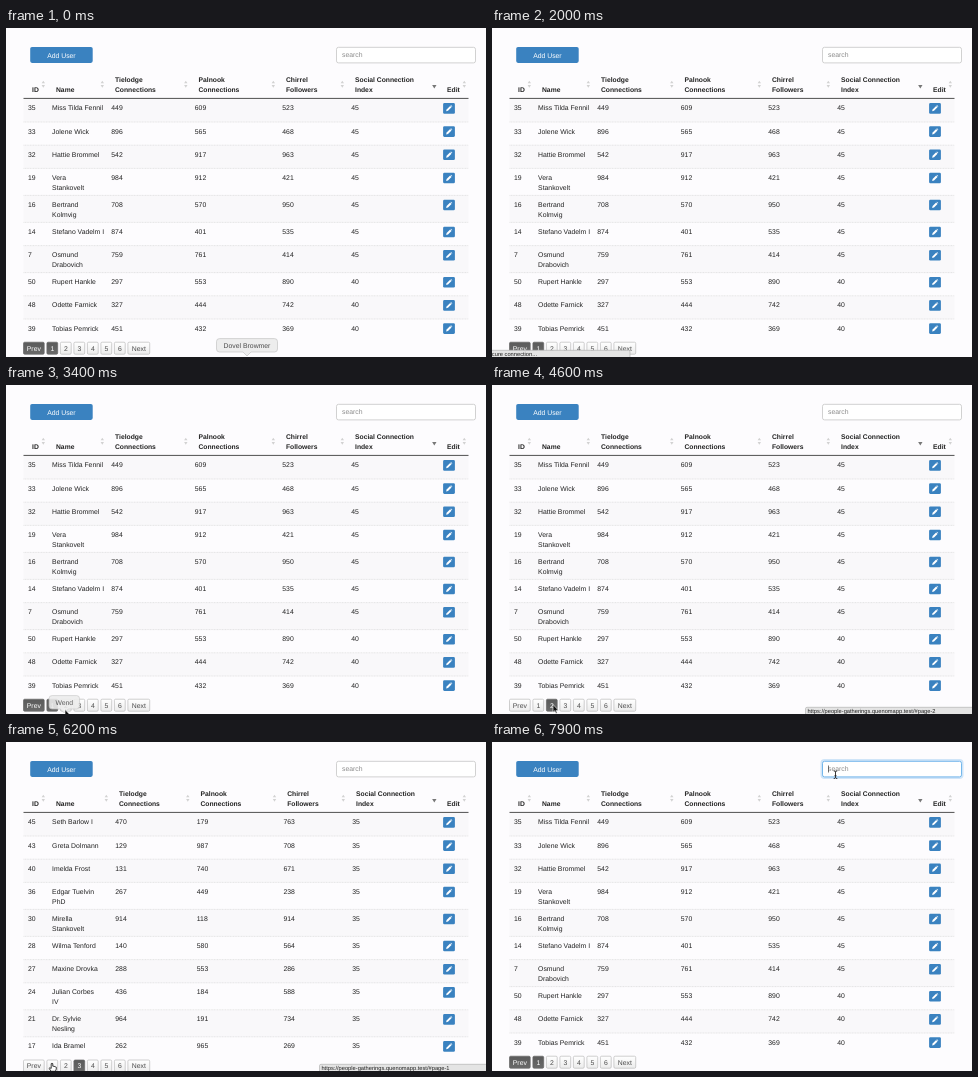
Recreate the animation shown at these times as an HTML page. Size 480 by 329 pixels, loop 8 s.

```html
<!DOCTYPE html>
<html lang="en">
<head>
<meta charset="utf-8">
<title>User table</title>
<style>
html, body { margin: 0; width: 100%; height: 100%; overflow: hidden; background: #fdfcfe; }
svg { display: block; width: 480px; height: 329px; }
text { font: 6.85px "Liberation Sans", Arial, sans-serif; fill: #222; text-rendering: geometricPrecision; white-space: pre; }
.head { font-weight: bold; font-size: 6.75px; }
.mid { text-anchor: middle; }
.end { text-anchor: end; }
.white { fill: #fff; }
.hint { fill: #8c8c8c; }
.pager { fill: #4c4c4c; }
.status { font-size: 5.73px; }
</style>
</head>
<body>
<svg viewBox="0 0 480 329">
  <defs>
    <linearGradient id="light" x2="0" y2="1"><stop stop-color="#fff"/><stop offset="1" stop-color="#ececec"/></linearGradient>
    <linearGradient id="dark" x2="0" y2="1"><stop stop-color="#5a5a5a"/><stop offset="1" stop-color="#6a6a6a"/></linearGradient>
  </defs>
  <g id="view"></g>
</svg>
<script>
const LOOP = 8000, STEP = 100;
const BLUE = '#3a82c0';

// Each row: id, name ("/" breaks the line), three counts.
const pages = [
  { cols: [109, 192.5, 280, 349], rows: `35,Miss Tilda Fennil,449,609,523
33,Jolene Wick,896,565,468
32,Hattie Brommel,542,917,963
19,Vera/Stankovelt,984,912,421
16,Bertrand/Kolmvig,708,570,950
14,Stefano Vadelm I,874,401,535
7,Osmund/Drabovich,759,761,414
50,Rupert Hankle,297,553,890
48,Odette Farnick,327,444,742
39,Tobias Pemrick,451,432,369` },
  { cols: [118.5, 199.3, 284.2, 351.5], rows: `31,Noreen Tavish,420,604,363
29,Miss Corbin/Veldrick,749,479,375
22,Samira Quell,666,211,450
20,Leopold Tarney,742,992,281
15,Paige Hendrask,341,861,726
9,Mustafa Kronnerfeld,429,396,884
6,Dorrie Plimley,223,914,945
5,Sabine/Unterhalden,487,225,679
1,Bethany Zolnica,612,382,918
47,Miss Clarice Dorn,340,965,218` },
  { cols: [113, 194.5, 281.2, 350], rows: `45,Seth Barlow I,470,179,763
43,Greta Dolmann,129,987,708
40,Imelda Frost,131,740,671
36,Edgar Tuelvin/PhD,267,449,238
30,Mirella/Stankovelt,914,118,914
28,Wilma Tenford,140,580,564
27,Maxine Drovka,288,553,286
24,Julian Corbes/IV,436,184,588
21,Dr. Sylvie/Nesling,964,191,734
17,Ida Bramel,262,965,269` }
];
const titles = ['ID', 'Name', 'Tielodge/Connections', 'Palnook/Connections', 'Chirrel/Followers', 'Social Connection/Index', 'Edit'];

const text = (x, y, s, cls = '') => `<text x="${x}" y="${y}" class="${cls}">${s}</text>`;
const box = (x, y, w, h, fill, r = 0, more = '') =>
  `<rect x="${x}" y="${y}" width="${w}" height="${h}" rx="${r}" fill="${fill}" ${more}/>`;
const path = (d, fill, more = '') => `<path d="${d}" fill="${fill}" ${more}/>`;
const at = (x, y, s) => `<g transform="translate(${x} ${y})">${s}</g>`;

function toolbar(focused) {
  const glow = focused ? box(329.5, 18, 141, 18, 'none', 3, 'stroke="#66afe9" stroke-opacity=".3" stroke-width="2"') : '';
  return box(24.2, 18.9, 62.5, 16, BLUE, 1.8) + text(55.4, 29.5, 'Add User', 'mid white') + glow +
    box(330.5, 19.3, 139, 15.6, '#fff', 2, `stroke="${focused ? '#66afe9' : '#ccc'}" stroke-width=".9"`) +
    text(336, 29.3, 'search', 'hint') +
    (focused ? box(336, 23.5, .7, 7, '#333') : '');
}

function header(cols) {
  const xs = [26, 50, ...cols, 441];
  return titles.map((title, i) => {
    const lines = title.split('/');
    const iconX = i < 6 ? xs[i + 1] - 12.7 : 458.3;
    const icon = i === 5
      ? path('M-2.2 .6h4.4L0 4.2z', '#777')
      : path('M-1.7-1h3.4L0-3.6zM-1.7 .8h3.4L0 3.4z', '#d2d2d2');
    return lines.map((s, k) => text(xs[i], 63.5 - 9.7 * (lines.length - 1 - k), s, 'head')).join('') + at(iconX, 56.3, icon);
  }).join('') + box(17.5, 69.9, 445, 1, '#505050');
}

const editButton = box(-5.9, -5.3, 11.8, 10.6, BLUE, 1.3) +
  path('M-2.9 2.9l.5-1.9L1.1-2.5 2.5-1.1-1 2.4z', '#fff') +
  path('M1.5-2.9l.5-.4 1.3 1.3-.4.5z', '#fff');

// Returns the drawn rows and the text centre of the last one.
function table(page) {
  const { cols, rows } = pages[page];
  let y = 80, last = y, out = '';
  rows.split('\n').forEach((row, i) => {
    const [id, name, ...counts] = row.split(',');
    const lines = name.split('/');
    const height = lines.length > 1 ? 27 : 23.2;
    const rank = page * 10 + i;
    counts.push(rank < 7 ? 45 : rank < 19 ? 40 : 35);
    const top = y - 9.2, base = y + 2.4;
    if (i % 2 === 0) out += box(17.5, top, 445, height, '#f9f8fa');
    if (i > 0) out += `<path d="M17.5 ${top}h445" stroke="#d8d8d8" stroke-width=".7" stroke-dasharray="1 .6"/>`;
    out += text(22, base, id) + lines.map((s, k) => text(46.1, base + 9.5 * k, s)).join('');
    out += counts.map((n, k) => text(cols[k] - 3.7, base, n)).join('');
    out += at(443, y + .4, editButton);
    last = y;
    y += height;
  });
  return [out + header(cols), last];
}

function pager(current, y) {
  let x = 17.5;
  return ['Prev', 1, 2, 3, 4, 5, 6, 'Next'].map((label, i) => {
    const w = i === 0 ? 20.7 : i === 7 ? 21.8 : 10.8;
    const dark = i === current + 1 || (i === 0 && current === 0);
    const out = box(x, y - 6, w, 12, dark ? 'url(#dark)' : 'url(#light)', 1.2, `stroke="${dark ? '#666' : '#bbb'}" stroke-width=".7"`) +
      text(x + w / 2, y + 2.4, label, 'mid ' + (dark ? 'white' : 'pager'));
    x += w + 2.7;
    return out;
  }).join('');
}

function tooltip(x, w, label, alpha) {
  const l = x - w / 2, r = x + w / 2;
  const d = `M${l + 3} 310.6H${r - 3}q3 0 3 3v7.4q0 3-3 3H${x + 4}l-4 4-4-4H${l + 3}q-3 0-3-3v-7.4q0-3 3-3z`;
  return `<g opacity="${alpha}">` + path(d, '#ededed', 'stroke="#c4c4c4" stroke-width=".7"') +
    text(x, 319.6, label, 'mid pager') + '</g>';
}

const statusBox = (x, w) => box(x, 322.3, w, 9, '#e4e4e4', 1.5, 'stroke="#b4b4b4" stroke-width=".7"');
const leftStatus = () => statusBox(-4, 142) + text(45, 328, 'Establishing secure connection...', 'status end');
const rightStatus = n => statusBox(313.5, 170) +
  text(315.4, 328, `https://people-gatherings.quenomapp.test/#page-${n}`, 'status');

const cursors = {
  arrow: path('M0 0V7.8L1.8 6.2 3 9 4.2 8.5 3 5.8H5.5Z', '#111', 'stroke="#fff" stroke-width=".6"'),
  hand: path('M-.8.7Q0-.5.8.7V3.2L2 3.3 3.2 3.7 4.3 4.2V6L3.4 8.3H-.9L-2.9 5.4Q-2.7 4.2-.8 5.4Z', '#fff', 'stroke="#111" stroke-width=".8" stroke-linejoin="round"'),
  beam: path('M-1.8-3.8Q0-3.8 0-2.8Q0-3.8 1.8-3.8M0-2.8V2.8M-1.8 3.8Q0 3.8 0 2.8Q0 3.8 1.8 3.8M-1 1H1', 'none', 'stroke="#222" stroke-width=".9"')
};
// Time, x, y.
const route = [[3100, 56, 331], [3400, 59, 324.5], [3800, 61, 319.5], [4700, 61, 319.5], [5100, 79, 317],
  [5600, 79, 317], [6000, 46, 321], [6900, 46, 321], [7600, 343.5, 32.7]];

function pointer(t) {
  if (t < route[0][0]) return '';
  const next = route.findIndex(p => p[0] > t);
  const b = next < 0 ? route[route.length - 1] : route[next];
  const a = next < 0 ? b : route[next - 1];
  const u = a === b ? 1 : (t - a[0]) / (b[0] - a[0]);
  const ease = u * u * (3 - 2 * u);
  const kind = t >= 7500 ? 'beam'
    : t < 3900 || (t >= 4600 && t < 4800) || t >= 7000 ? 'arrow' : 'hand';
  return at(a[1] + (b[1] - a[1]) * ease, a[2] + (b[2] - a[2]) * ease, cursors[kind]);
}

const pageAt = t => t < 4700 ? 0 : t < 5600 ? 1 : t < 6600 ? 2 : 0;

function scene(t) {
  const [rows, last] = table(pageAt(t));
  // The pager reacts one step before the rows.
  let out = toolbar(t >= 7800) + rows + pager(pageAt(t + STEP), last + 20);
  if (t < 1100) out += tooltip(241, 61, 'Dovel Browmer', 1);
  if (t >= 1500 && t < 2500) out += leftStatus();
  if (t >= 3200 && t < 3700) out += tooltip(58.3, 30.5, 'Wend', t < 3600 ? .88 : .4);
  if (t >= 3900 && t < 7000) out += rightStatus(t < 5000 ? 2 : t < 6000 ? 3 : 1);
  return out + pointer(t);
}

const view = document.getElementById('view');
let shown = -1;
function draw() {
  const t = Math.floor(performance.now() % LOOP / STEP) * STEP;
  if (t !== shown) view.innerHTML = scene(shown = t);
  requestAnimationFrame(draw);
}
draw();
</script>
</body>
</html>
```
